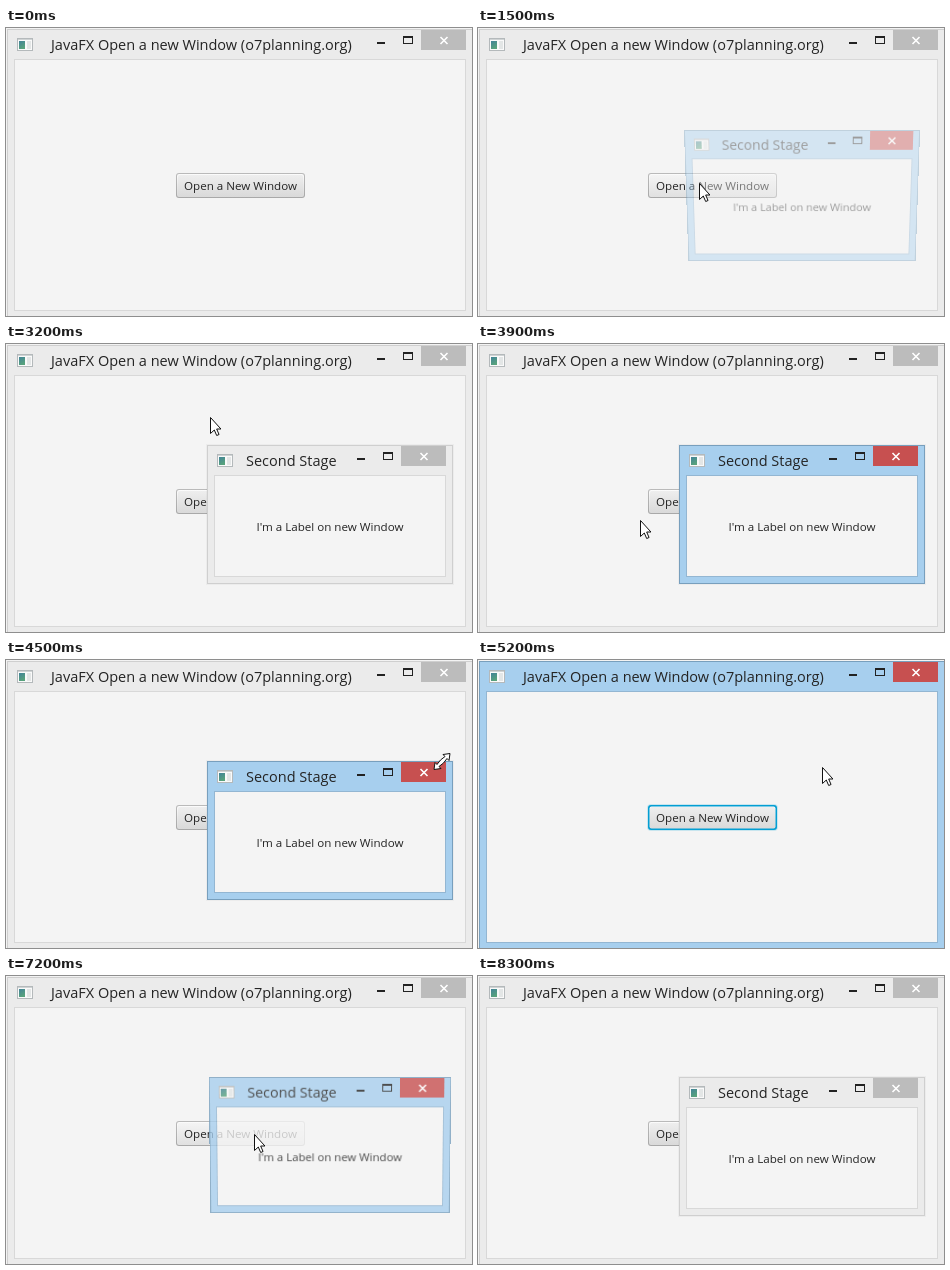
An HTML page with a canvas that plays this animation: 466x288 px, repeating every 8.4 s.

```html
<!DOCTYPE html>
<html lang="en">
<head>
<meta charset="utf-8">
<title>Open a new window</title>
<style>
html, body { margin: 0; width: 100%; height: 100%; overflow: hidden; background: #f4f4f4; }
canvas { display: block; }
</style>
</head>
<body>
<canvas id="stage" width="466" height="288"></canvas>
<script>
const LOOP = 8400, STEP = 100;
const MAIN = { x: 1, y: 1, w: 466, h: 289, indent: 44, title: "JavaFX Open a new Window (o7planning.org)" };
const SECOND = { x: 201, y: 101, w: 246, h: 139, indent: 39, title: "Second Stage" };
const ctx = document.getElementById("stage").getContext("2d");
const buffer = document.createElement("canvas");
buffer.width = SECOND.w;
buffer.height = SECOND.h;
const bctx = buffer.getContext("2d");

// Pointer stops; it glides to each one between its two times.
const ENTRY = { x: 391, y: 62 };
const STOPS = [
  { from: 500, to: 1000, x: 222, y: 155 },
  { from: 1900, to: 2500, x: 303, y: 77 },
  { from: 2600, to: 3200, x: 205, y: 73 },
  { from: 3200, to: 3500, x: 112, y: 190 },
  { from: 3700, to: 4500, x: 436, y: 101 },
  { from: 4500, to: 4600, x: 415, y: 113 },
  { from: 4800, to: 5600, x: 275, y: 101 },
  { from: 6000, to: 6500, x: 249, y: 158 },
  { from: 7300, to: 7800, x: 432, y: 61 }
];

const within = (t, a, b) => t >= a && t < b;
const clamp = v => Math.min(1, Math.max(0, v));
const smooth = u => u * u * (3 - 2 * u);

function pointerAt(t) {
  if (!within(t, STOPS[0].from, STOPS[STOPS.length - 1].to + STEP)) return null;
  let { x, y } = ENTRY;
  for (const s of STOPS) {
    const u = smooth(clamp((t - s.from) / (s.to - s.from)));
    x += (s.x - x) * u;
    y += (s.y - y) * u;
  }
  return { x: Math.round(x), y: Math.round(y) };
}

function rect(g, x, y, w, h, color) {
  g.fillStyle = color;
  g.fillRect(x, y, w, h);
}

function frame(g, x, y, w, h, color) {
  g.strokeStyle = color;
  g.lineWidth = 1;
  g.strokeRect(x + .5, y + .5, w - 1, h - 1);
}

function text(g, s, x, y, size) {
  g.font = `${size}px "Open Sans", "Noto Sans", sans-serif`;
  g.fillStyle = "#242424";
  g.fillText(s, x, y);
}

function poly(g, points) {
  g.beginPath();
  points.forEach(([x, y]) => g.lineTo(x, y));
  g.closePath();
  g.fillStyle = "#fff";
  g.fill();
  g.strokeStyle = "#111";
  g.lineWidth = 1;
  g.stroke();
}

function shade(g, x0, y0, x1, y1, from, to) {
  const s = g.createLinearGradient(x0, y0, x1, y1);
  s.addColorStop(0, from);
  s.addColorStop(1, to);
  return s;
}

function drawIcon(g, x, y) {
  rect(g, x, y, 16, 13, "#fafafa");
  frame(g, x, y, 16, 13, "#b4b9bb");
  rect(g, x + 1, y + 1, 14, 1, "#cfd3d4");
  rect(g, x + 2, y + 3, 6, 8, shade(g, x, y + 3, x + 5, y + 11, "#3f7f9c", "#58a37c"));
  rect(g, x + 10, y + 3, 4, 8, "#e3e6e6");
}

function drawWindow(g, win, active, closeColor) {
  const { x, y, w, h, indent, title } = win;
  const right = x + w - 7;
  rect(g, x, y, w, h, active ? "#a7cfee" : "#ebebeb");
  frame(g, x, y, w, h, active ? "#789fbd" : "#cfcfcf");
  rect(g, x + 7, y + 30, w - 14, h - 37, "#f4f4f4");
  frame(g, x + 7, y + 30, w - 14, h - 37, active ? "#93b6d2" : "#d8d8d8");
  drawIcon(g, x + 10, y + 9);
  text(g, title, x + indent, y + 21, 14.5);

  rect(g, right - 89, y + 13, 8, 2, "#222");
  frame(g, right - 63, y + 7, 10, 8, "#222");
  rect(g, right - 63, y + 7, 10, 2, "#222");

  rect(g, right - 45, y + 1, 45, 20, closeColor || (active ? "#c75050" : "#bcbcbc"));
  const cx = right - 22, cy = y + 11.5;
  g.strokeStyle = "#fff";
  g.lineWidth = 1.6;
  g.beginPath();
  for (const d of [-3.5, 3.5]) {
    g.moveTo(cx - d, cy - 3.5);
    g.lineTo(cx + d, cy + 3.5);
  }
  g.stroke();
}

function drawButton(focused, hover, pressed) {
  const box = (inset, r, fill) => {
    ctx.beginPath();
    ctx.roundRect(170 + inset, 145 + inset, 129 - 2 * inset, 25 - 2 * inset, r);
    ctx.fillStyle = fill;
    ctx.fill();
  };
  const [top, bottom] = pressed ? ["#d2d2d2", "#dcdcdc"] : hover ? ["#f4f4f4", "#e1e1e1"] : ["#eeeeee", "#dadada"];
  if (focused) box(-1, 4, "rgba(3,158,211,.18)");
  box(0, 3, focused ? "#039ed3" : shade(ctx, 0, 145, 0, 170, "#bababa", "#a8a8a8"));
  box(focused ? 1.5 : 1, 2, shade(ctx, 0, 146, 0, 169, pressed ? top : "#fbfbfb", bottom));
  box(2, 2, shade(ctx, 0, 147, 0, 168, top, bottom));
  text(ctx, "Open a New Window", 178, 162, 11.6);
}

function drawSecond(g, active, closeColor) {
  drawWindow(g, SECOND, active, closeColor);
  text(g, "I'm a Label on new Window", 250.5, 187, 11.6);
}

// Tilts the window back by amount k and fades it, row by row.
function drawTilted(k) {
  const { x, y, w, h } = SECOND;
  bctx.setTransform(1, 0, 0, 1, -x, -y);
  drawSecond(bctx, true);
  const rows = Math.round(h - 8 * k), top = Math.round(y + k);
  ctx.globalAlpha = clamp(1 - .58 * k);
  for (let i = 0; i < rows; i++) {
    const width = w * (1 - k * (.04 + .037 * i / rows));
    ctx.drawImage(buffer, 0, i * h / rows, w, h / rows, x + (w - width) / 2, top + i, width, 1);
  }
  ctx.globalAlpha = 1;
}

function tiltAt(t) {
  for (const start of [1500, 7100]) {
    if (within(t, start, start + 500)) return Math.pow(.35, Math.min(2, (t - start) / STEP));
  }
  return within(t, 4900, 5200) ? .5 * (1 + (t - 4900) / STEP) : 0;
}

function drawArrow({ x, y }) {
  const shape = [[0, 0], [0, 16], [4, 12.5], [6.5, 18], [9, 17], [6.5, 11.5], [11, 11.5]];
  poly(ctx, shape.map(([a, b]) => [x - .5 + a * .95, y + .5 + b]));
}

function drawResize({ x, y }) {
  const half = [[-1.5, -1.5], [3, -5], [1, -7], [8, -8], [7, -1], [5, -3], [1.5, 1.5]];
  const other = half.map(([a, b]) => [-a, -b]);
  poly(ctx, [...half, ...other].map(([a, b]) => [x + a, y + .5 + b]));
}

function draw(t) {
  const pressed = within(t, 1300, 1500) || within(t, 6900, 7100);
  const mainActive = within(t, 1300, 1500) || within(t, 4900, 7100);
  const hover = within(t, 900, 2100) || within(t, 6400, 7400);
  const open = within(t, 1500, 5200) || t >= 7100;
  const flash = within(t, 3200, 3500) && t % 200 === 0 || t >= 8300;

  rect(ctx, 0, 0, 466, 288, "#f3f3f3");
  drawWindow(ctx, MAIN, mainActive);
  drawButton(mainActive, hover, pressed);

  if (open) {
    const k = tiltAt(t);
    if (k) {
      drawTilted(k);
    } else {
      frame(ctx, SECOND.x - 1, SECOND.y - 1, SECOND.w + 2, SECOND.h + 2, "rgba(0,0,0,.03)");
      const close = within(t, 4600, 4700) ? "#e04343" : within(t, 4700, 4900) ? "#993d3d" : null;
      drawSecond(ctx, !flash, close);
    }
  }

  const pointer = pointerAt(t);
  if (pointer) (within(t, 4400, 4600) ? drawResize : drawArrow)(pointer);
}

const start = performance.now();
function tick() {
  const t = (performance.now() - start) % LOOP;
  draw(Math.floor(t / STEP) * STEP);
  requestAnimationFrame(tick);
}
tick();
</script>
</body>
</html>
```
